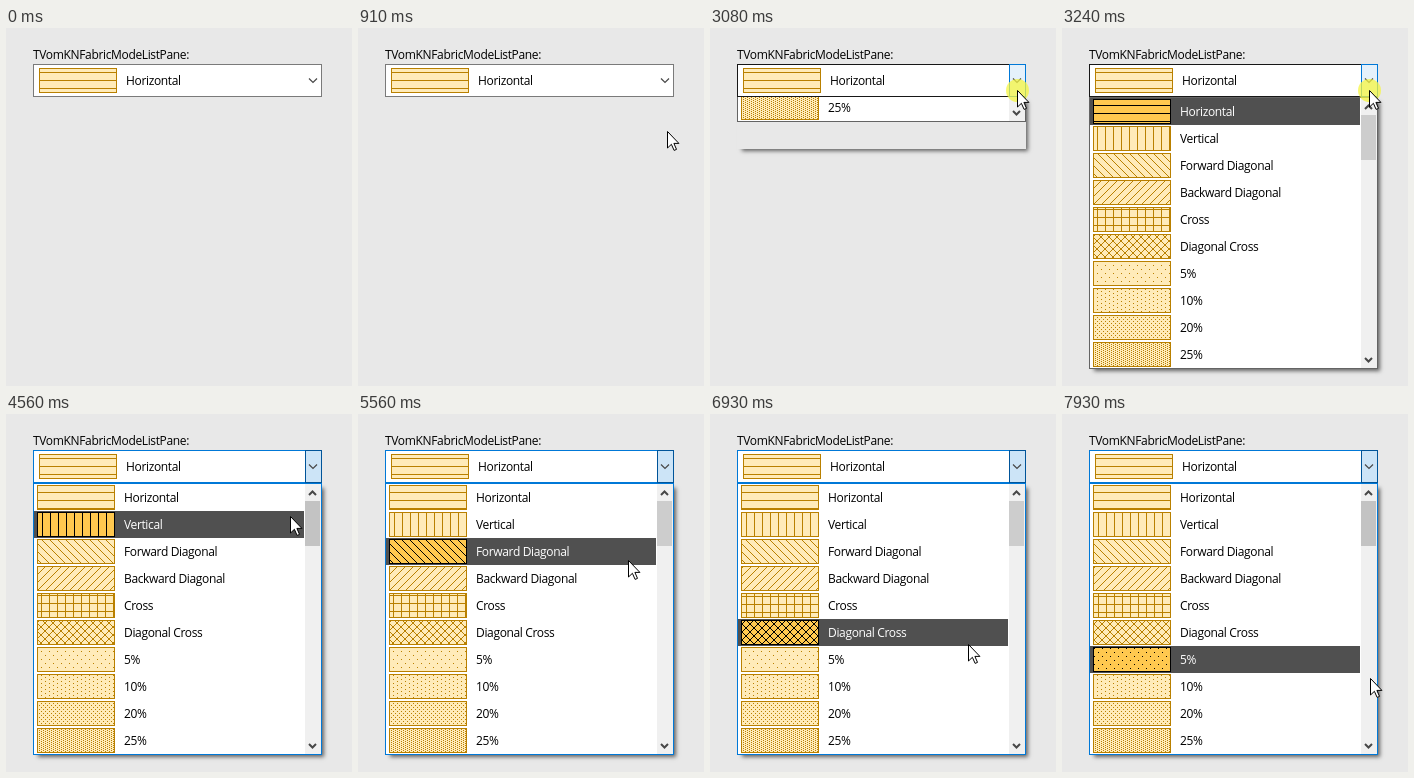
Recreate the animation shown at these times as an HTML page. Size 346x358 px, loop 8000 ms.

```html
<!DOCTYPE html>
<html lang="en">
<head>
<meta charset="utf-8">
<title>Hatch style list</title>
<style>
  html, body { margin: 0; width: 100%; height: 100%; overflow: hidden; background: #e8e8e8; }
  #shadow { position: absolute; left: 27px; top: 69px; width: 289px; box-shadow: 3px 3px 4px -1.5px rgba(0, 0, 0, .58); }
  svg { position: absolute; left: 0; top: 0; }
  text { font: 12px "Open Sans", "Noto Sans", sans-serif; letter-spacing: -.35px; fill: #000; }
  rect { shape-rendering: crispEdges; }
  .chevron { fill: none; stroke: #484848; stroke-width: 1.2; }
  .bold { stroke-width: 2; }

  .frame { stroke: #7a7a7a; fill: #fff; }
  .button { fill: none; }
  .list { fill: #fff; stroke: #646464; }
  .hover .frame { stroke: #171717; }
  .hover .button { fill: #e5f1fb; stroke: #0078d7; }
  .focus .frame, .focus .list { stroke: #0078d7; }
  .focus .button { fill: #cce4f7; stroke: #005499; }
  .thumb { fill: #cdcdcd; }
  .warm .thumb { fill: #c3c3c3; }

  .base { fill: #ffebb9; }
  .edge { fill: none; stroke: #b98000; }
  .bar { fill: none; }
  .row.on .bar { fill: #505050; }
  .row.on text { fill: #fff; }
  .row.on .base { fill: #ffc84f; }
  .row.on .edge { stroke: #000; }
  .row.on .gold { display: none; }
  .row:not(.on) .black { display: none; }
  .click { fill: #f5f540; opacity: .75; }
</style>
</head>
<body>
<div id="shadow"></div>
<svg id="stage" width="346" height="358" viewBox="0 0 346 358">
  <defs id="defs">
    <clipPath id="drop"><rect x="27" y="69" width="289" height="272"/></clipPath>
  </defs>
  <text x="27" y="31">TVomKNFabricModeListPane:</text>
  <g clip-path="url(#drop)">
    <g id="panel">
      <rect class="list" x="27.5" y="69.5" width="288" height="271"/>
      <rect x="299" y="70" width="16" height="270" fill="#f0f0f0"/>
      <rect class="thumb" x="299" y="87" width="15" height="45"/>
      <path class="chevron bold" d="M303 81l3.5-3.5 3.5 3.5M303 330l3.5 3.5 3.5-3.5"/>
      <g id="rows" transform="translate(28 70)"></g>
    </g>
  </g>
  <rect class="frame" x="27.5" y="36.5" width="288" height="32"/>
  <rect class="button" x="299.5" y="36.5" width="16" height="32"/>
  <path class="chevron" d="M303 50.5l4 4 4-4"/>
  <g id="value" transform="translate(27 36)"></g>
  <circle id="click" class="click" cx="307.5" cy="62.5" r="11.5"/>
  <path id="cursor" d="M.5 .5V17L4.4 13.3 7.1 19.4 9.5 18.4 6.9 12.4H11.9Z" fill="#fff" stroke="#000"/>
</svg>
<script>
const $ = id => document.getElementById(id);
const LOOP = 8000, ROW = 27;

// Each style: name, tile width, tile height, then dots or a path.
const dots = (...points) => points.map(([x, y]) => `<rect x="${x}" y="${y}" width="1" height="1"/>`).join('');
const line = (w, h) => `<rect width="${w}" height="${h}"/>`;
const slash = d => `<path d="${d}" fill="none"/>`;
const down = slash('M-1-1L9 9M-1 7L1 9M7-1L9 1');
const up = slash('M-1 9L9-1M-1 1L1-1M7 9L9 7');
const styles = [
  ['Horizontal', 8, 8, line(8, 1)],
  ['Vertical', 8, 8, line(1, 8)],
  ['Forward Diagonal', 8, 8, down],
  ['Backward Diagonal', 8, 8, up],
  ['Cross', 8, 8, line(8, 1) + line(1, 8)],
  ['Diagonal Cross', 8, 8, down + up],
  ['5%', 8, 8, dots([0, 0], [4, 4])],
  ['10%', 8, 8, dots([0, 0], [4, 2], [0, 4], [4, 6])],
  ['20%', 4, 4, dots([0, 0], [2, 2])],
  ['25%', 4, 2, dots([0, 0], [2, 1])]
];

function tile(ink, color, i) {
  const [, w, h, art] = styles[i];
  const stroke = art.includes('path') ? color : 'none';
  return `<pattern id="${ink}${i}" width="${w}" height="${h}" patternUnits="userSpaceOnUse">
    <g fill="${color}" stroke="${stroke}">${art}</g></pattern>`;
}

$('defs').insertAdjacentHTML('beforeend', tile('value', '#b98000', 0)
  + styles.map((_, i) => tile('gold', '#b98000', i) + tile('black', '#000', i)).join(''));

function swatch(i, x, y, inks) {
  const w = 78, h = 25;
  const box = `x="${x}" y="${y}" width="${w}" height="${h}"`;
  return `<rect class="base" ${box}/>`
    + inks.map(ink => `<rect class="${ink}" ${box} fill="url(#${ink}${i})"/>`).join('')
    + `<rect class="edge" x="${x + .5}" y="${y + .5}" width="${w - 1}" height="${h - 1}"/>`;
}

$('rows').innerHTML = styles.map(([name], i) => `<g class="row">
  <rect class="bar" y="${i * ROW}" width="270" height="${ROW}"/>
  ${swatch(i, 3, i * ROW + 1, ['gold', 'black'])}
  <text x="90" y="${i * ROW + 18}">${name}</text></g>`).join('');
$('value').innerHTML = swatch(0, 6, 4, ['value']) + '<text x="93" y="21">Horizontal</text>';
const rows = [...document.querySelectorAll('.row')];

// Pointer moves: start, end, steps, end x, end y.
const moves = [
  [290, 1060, 11, 309, 87],
  [1140, 1670, 8, 307, 62],
  [4020, 4790, 11, 281, 107],
  [4940, 5330, 6, 272, 137],
  [5560, 5870, 5, 265, 164],
  [6020, 6250, 4, 258, 193],
  [6400, 6640, 4, 258, 212],
  [6850, 7090, 4, 258, 238],
  [7390, 7930, 8, 308, 264]
];

function pointer(t) {
  let x = 311, y = 385;
  for (const [from, to, steps, endX, endY] of moves) {
    if (t < from) break;
    const step = Math.min(steps, Math.floor((t - from) / (to - from) * (steps - 1) + 1e-6) + 1);
    const ease = 1 - (1 - step / steps) ** 1.7;
    x += (endX - x) * ease;
    y += (endY - y) * ease;
  }
  return [Math.round(x), Math.round(y)];
}

// List slide: start, content offset, shadow height.
const slides = [[0, -272, 0], [3080, -247, 52], [3160, -120, 171], [3240, 0, 272]];

function draw(t) {
  const [x, y] = pointer(t);
  const [, shift, height] = slides.filter(s => s[0] <= t).pop();
  const picked = Math.max(0, Math.min(6, Math.floor((y - 70) / ROW)));
  const over = t >= 1140 && y < 69;
  const focus = t >= 3320;
  const state = focus ? 'focus' : over ? 'hover' : '';

  $('stage').setAttribute('class', focus && x >= 284 ? state + ' warm' : state);
  $('cursor').setAttribute('transform', `translate(${x} ${y})`);
  $('cursor').style.display = t < 290 ? 'none' : '';
  $('click').style.display = t >= 3080 && !focus ? '' : 'none';
  $('panel').setAttribute('transform', `translate(0 ${shift})`);
  $('panel').style.display = height ? '' : 'none';
  $('shadow').style.display = height ? '' : 'none';
  $('shadow').style.height = height + 'px';

  rows.forEach((row, i) => {
    row.classList.toggle('on', t >= 3080 && i === picked);
    // Hatches start at the list's outer corner until the pointer has passed the row.
    const origin = picked === 0 || i > picked ? -1 : 0;
    for (const ink of ['gold', 'black']) {
      $(ink + i).setAttribute('patternTransform', `translate(${origin} ${origin})`);
    }
  });
}

function tick() {
  draw(performance.now() % LOOP);
  requestAnimationFrame(tick);
}
tick();
</script>
</body>
</html>
```
